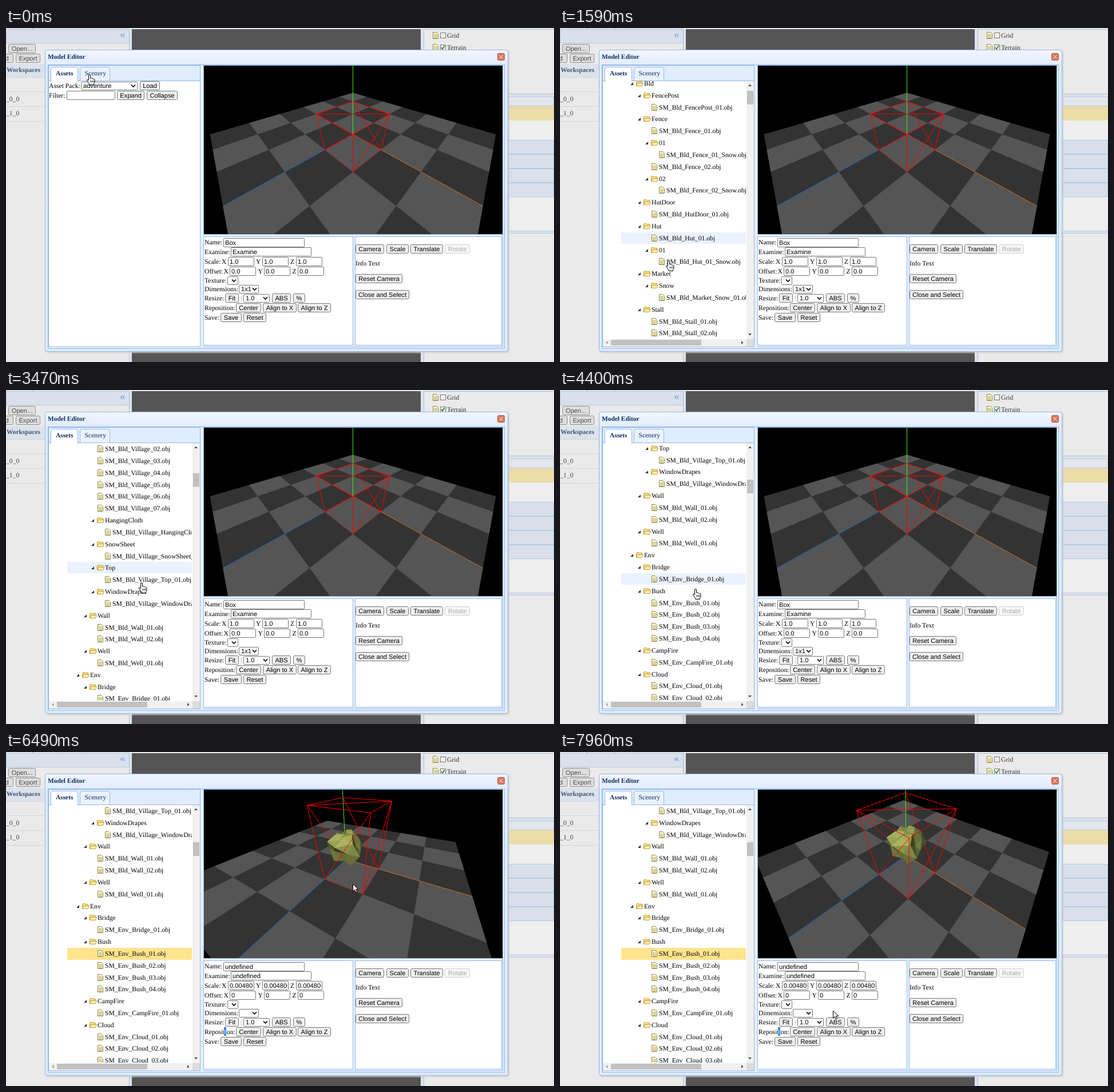
An HTML page with a canvas for the animation above (8000 ms loop, 958x585 px).

```html
<!DOCTYPE html>
<html lang="en">
<head>
<meta charset="utf-8">
<title>Model Editor</title>
<style>
html, body { margin: 0; width: 100%; height: 100%; overflow: hidden; background: #eaeaea; }
canvas { display: block; }
</style>
</head>
<body>
<canvas id="stage" width="958" height="585"></canvas>
<script>
const ctx = document.getElementById('stage').getContext('2d');
ctx.textRendering = 'geometricPrecision';
const LOOP = 8000;
const SERIF = '11.67px "Liberation Serif", serif';
const BOLD = 'bold 11.4px "Liberation Serif", serif';
const SANS = '11.11px "Liberation Sans", sans-serif';
const BLUE = '#95b8e7';

// ---------- helpers ----------
function rect(x, y, w, h, fill, stroke) {
  if (fill) { ctx.fillStyle = fill; ctx.fillRect(x, y, w, h); }
  if (stroke) { ctx.strokeStyle = stroke; ctx.lineWidth = 1; ctx.strokeRect(x + .5, y + .5, w - 1, h - 1); }
}
function rounded(x, y, w, h, r, fill, stroke) {
  ctx.beginPath();
  ctx.roundRect(x + .5, y + .5, w - 1, h - 1, r);
  ctx.fillStyle = fill; ctx.fill();
  ctx.strokeStyle = stroke; ctx.lineWidth = 1; ctx.stroke();
}
function text(s, x, y, font = SERIF, color = '#000', align = 'left') {
  ctx.font = font; ctx.fillStyle = color; ctx.textAlign = align;
  ctx.fillText(s, x, y + 4);
}
function poly(points, fill, stroke) {
  ctx.beginPath();
  points.forEach(p => ctx.lineTo(p[0], p[1]));
  ctx.closePath();
  if (fill) { ctx.fillStyle = fill; ctx.fill(); }
  if (stroke) { ctx.strokeStyle = stroke; ctx.lineWidth = 1; ctx.stroke(); }
}
function line(a, b, color, dash = []) {
  ctx.beginPath();
  ctx.moveTo(a[0], a[1]); ctx.lineTo(b[0], b[1]);
  ctx.strokeStyle = color; ctx.lineWidth = 1;
  ctx.setLineDash(dash); ctx.stroke(); ctx.setLineDash([]);
}
function clip(x, y, w, h, draw) {
  ctx.save();
  ctx.beginPath(); ctx.rect(x, y, w, h); ctx.clip();
  draw();
  ctx.restore();
}
// fill, border and text colour
const NORMAL = ['#efefef', '#767676', '#000'], DISABLED = ['#f7f7f7', '#cfcfcf', '#aaa'], DIMMED = ['#dedede', '#8f8f8f', '#4a4a4a'];
function button(s, x, cy, w, [fill, border, color] = NORMAL) {
  rounded(x, cy - 8, w, 16, 2, fill, border);
  text(s, x + w / 2, cy, SANS, color, 'center');
}
function input(s, x, cy, w) {
  rounded(x, cy - 8, w, 16, 1, '#fff', '#767676');
  clip(x + 2, cy - 8, w - 4, 16, () => text(s, x + 3, cy, SANS));
}
function select(s, x, cy, w) {
  rounded(x, cy - 7, w, 15, 1, '#fff', '#767676');
  text(s, x + 4, cy, SANS);
  ctx.beginPath();
  ctx.moveTo(x + w - 11, cy - 1.5); ctx.lineTo(x + w - 7.5, cy + 2); ctx.lineTo(x + w - 4, cy - 1.5);
  ctx.strokeStyle = '#000'; ctx.lineWidth = 1.7; ctx.stroke();
}
// keys: rows of [time, value...], linear in between
function track(keys, t) {
  const i = keys.findIndex(k => k[0] > t);
  if (i === 0) return keys[0].slice(1);
  if (i < 0) return keys[keys.length - 1].slice(1);
  const a = keys[i - 1], b = keys[i], f = (t - a[0]) / (b[0] - a[0]);
  return a.slice(1).map((v, n) => v + (b[n + 1] - v) * f);
}

// ---------- motion ----------
const SCROLL = [[1480, -83.3], [1590, 0], [1720, 0], [2210, 249.5], [2410, 249.5], [2840, 455],
  [3150, 455], [3470, 660.5], [3880, 660.5], [4450, 889.8]];
const POINTER = [[0, 146, 82], [110, 146, 82], [330, 249, 103], [420, 249, 103], [600, 219, 120], [700, 219, 120],
  [850, 200, 268], [960, 198, 290], [1260, 190, 408], [1700, 190, 408], [2210, 225, 358], [2410, 225, 358],
  [3150, 228, 350], [3470, 237, 338], [4610, 237, 351], [5400, 237, 351], [5650, 382, 478],
  [5880, 501, 433], [6180, 586, 236], [6290, 588, 235], [6910, 643, 223], [7020, 643, 224],
  [7320, 586, 233], [7480, 586, 233], [7700, 394, 400], [7960, 477, 453]];
const CAMERA = [[6240, 45, 43.3], [6910, 0, 38.3], [7020, 0, 38.3], [7320, 43, 53.1]];
const LOADED = 600, PICKED = 5030, MODEL = 5470, MARKED = 5650;

// ---------- page behind ----------
function fileIcon(x, cy) {
  poly([[x + .5, cy - 5.5], [x + 6.5, cy - 5.5], [x + 9.5, cy - 2.5], [x + 9.5, cy + 5.5], [x + .5, cy + 5.5]], '#fbf8d5', '#8d8950');
  for (let i = -2; i < 5; i += 2) rect(x + 2, cy + i, 6, 1, '#b5ad62');
}
function page() {
  rect(0, 0, 958, 585, '#eaeaea');
  rect(0, 0, 216, 1, '#d2d8e0');
  rect(47, 0, 1, 2, '#999'); rect(96, 0, 1, 2, '#bbb'); rect(134, 0, 1, 2, '#bbb');
  rect(0, 2, 216, 25, '#d9e0eb', '#b6c8e2');
  text('«', 199, 13, '19px "Liberation Serif", serif', '#6b9be0');
  button('Open...', 4, 36, 48, DIMMED);
  button('nd', -16, 53, 29, DIMMED);
  button('Export', 17, 53, 43, DIMMED);
  rect(0, 63, 216, 23, '#dce2ec');
  text('Workspaces', 1, 73, BOLD, '#3f5470');
  [86, 111, 137, 163].forEach(y => rect(0, y, 216, 1, '#d3d6da'));
  text('_0_0', 0, 124, SERIF, '#444');
  text('_1_0', 0, 149, SERIF, '#444');
  rect(215, 2, 1, 583, '#a9bfdd');
  rect(216, 2, 4, 583, '#dde3eb');
  rect(220, 2, 505, 583, '#555');
  rect(725, 2, 5, 583, '#dde3eb');
  rect(730, 2, 1, 583, '#a9bfdd');
  rect(730, 2, 228, 1, '#a9bfdd');
  [['Grid', 13], ['Terrain', 34]].forEach(([s, y]) => {
    fileIcon(746, y);
    rect(759, y - 5, 10, 10, '#f3f3f3', '#777');
    text(s, 771, y, SERIF, '#333');
  });
  ctx.beginPath(); ctx.moveTo(761, 34); ctx.lineTo(763, 37); ctx.lineTo(767, 31);
  ctx.strokeStyle = '#39902d'; ctx.lineWidth = 1.8; ctx.stroke();
  rect(730, 115, 228, 1, '#a9bfdd'); rect(730, 116, 228, 4, '#dde3eb');
  rect(730, 120, 228, 17, '#e2e6ed', '#b8c9e0');
  rect(730, 137, 228, 25, '#ebdca8');
  rect(730, 162, 228, 34, '#eee');
  for (let i = 0; i < 4; i++) rect(730, 196 + i * 25.2 | 0, 228, 25, '#d9e0ec', '#b5c8e4');
  rect(730, 297, 228, 58, '#eee');
  rect(730, 355, 228, 5, '#dde3eb', '#b5c8e4');
}

// ---------- dialog frame ----------
function dialog() {
  const g = ctx.createLinearGradient(0, 38, 0, 65);
  g.addColorStop(0, '#f1f6ff'); g.addColorStop(1, '#e0ecff');
  ctx.save();
  ctx.shadowColor = '#ccc'; ctx.shadowBlur = 2.5; ctx.shadowOffsetX = ctx.shadowOffsetY = 1.7;
  rounded(68, 38, 810, 529, 4, g, BLUE);
  ctx.restore();
  rounded(68, 38, 810, 529, 4, g, BLUE);
  text('Model Editor', 73, 50, BOLD, '#0e2d5f');
  rounded(859, 44, 13, 13, 2, '#d9775f', '#b95745');
  line([862.5, 47.5], [868.5, 53.5], '#fff'); line([868.5, 47.5], [862.5, 53.5], '#fff');
  rect(73, 64, 799, 498, '#e6f0ff', BLUE);
  rect(74, 65, 266, 494, '#fff', BLUE);
  rect(345, 65, 524, 297, '#000', BLUE);
  rect(345, 365, 262, 191, '#fff', BLUE);
  rect(610, 365, 257, 191, '#fff', BLUE);
  rect(868, 65, 1, 494, BLUE);
  rect(345, 558, 524, 1, BLUE);
}
function tabs() {
  rect(75, 66, 264, 27, '#e0ecff');
  rect(75, 92, 264, 1, BLUE);
  rounded(129, 68, 53, 25, [4, 4, 0, 0], '#eaf2ff', BLUE);
  rounded(78, 68, 48, 26, [4, 4, 0, 0], '#fff', BLUE);
  rect(79, 92, 46, 2, '#fff');
  text('Assets', 87, 79, BOLD, '#0e2d5f');
  text('Scenery', 137.5, 79, SERIF, '#0e2d5f');
}

// ---------- asset tree: depth digit, name; * marks a file ----------
const TREE = `0SM 1Bld 2FencePost 3*FencePost_01 2Fence 3*Fence_01 301 4*Fence_01_Snow 3*Fence_02 302 4*Fence_02_Snow
2HutDoor 3*HutDoor_01 2Hut 3*Hut_01 301 4*Hut_01_Snow 2Market 3Snow 4*Market_Snow_01
2Stall 3*Stall_#4 3Cover 4*Stall_Cover_#5 2Village 3*Village_#7 3HangingCloth 4*Village_HangingCloth_01
3SnowSheet 4*Village_SnowSheet_01 3Top 4*Village_Top_01 3WindowDrapes 4*Village_WindowDrapes_01
2Wall 3*Wall_#2 2Well 3*Well_01 1Env 2Bridge 3*Bridge_01 2Bush 3*Bush_#4 2CampFire 3*CampFire_01 2Cloud 3*Cloud_#4`
  .split(/\s+/).flatMap(s => {
    const m = s.match(/(.*)#(\d)/);
    return m ? Array.from({ length: +m[2] }, (_, i) => m[1] + '0' + (i + 1)) : [s];
  });
let group = '';
const ROWS = TREE.map(s => {
  const depth = +s[0], file = s[1] === '*';
  if (depth === 1) group = s.slice(1);
  return { depth, file, name: file ? `SM_${group}_${s.slice(2)}.obj` : s.slice(1) };
});
const PITCH = 20.83;

function folderIcon(x, cy) {
  poly([[x + .5, cy + 4.5], [x + .5, cy - 3.5], [x + 1.5, cy - 4.5], [x + 4.5, cy - 4.5], [x + 5.5, cy - 3.5], [x + 10.5, cy - 3.5], [x + 10.5, cy + 4.5]], '#f8dc82', '#c09c3c');
  poly([[x + 1, cy + 4.5], [x + 2.5, cy - .5], [x + 12.5, cy - .5], [x + 10.5, cy + 4.5]], '#ffefb0', '#c6a040');
}
function tree(t, pointer) {
  const off = track(SCROLL, t)[0];
  clip(75, 93, t < LOADED ? 264 : 250, t < LOADED ? 465 : 451, () => {
    const top = -83.3 - off;
    text('Asset Pack:', 75, 101 + top);
    select('adventure', 131, 101 + top, 99);
    button('Load', 234, 101 + top, 35);
    text('Filter:', 75, 118 + top);
    input('', 106, 118 + top, 85);
    button('Expand', 194, 118 + top, 48);
    button('Collapse', 246, 118 + top, 54);
    if (t < LOADED) return;
    const lag = track(SCROLL, t - 45)[0];
    const hover = Math.round((pointer[1] + lag - 97) / PITCH) + 1;
    const picked = ROWS.findIndex(r => r.name === 'SM_Env_Bush_01.obj');
    ROWS.forEach((r, i) => {
      const y = 97 + (i - 1) * PITCH - off, cy = Math.round(y), x = 107 + r.depth * 13;
      if (y < 75 || y > 565) return;
      if (t >= PICKED && i === picked) rect(107, cy - 10, 218, 21, '#ffe48d');
      else if (i === hover && t < PICKED && pointer[1] > 135) rect(107, cy - 10, 218, 20, '#eaf2ff');
      if (r.file) fileIcon(x + 14, cy);
      else {
        poly([[x + 8, cy - 2], [x + 8, cy + 3], [x + 3, cy + 3]], '#333');
        folderIcon(x + 13, cy);
      }
      text(r.name, x + 27, cy);
    });
  });
  if (t < LOADED) return;
  rect(326, 93, 13, 452, '#f1f1f1');
  rect(327, 110 + off * .054, 11, 24, '#c1c1c1');
  rect(75, 545, 264, 13, '#f1f1f1');
  rect(89, 546, 158, 10, '#c1c1c1');
  rect(326, 545, 13, 13, '#dcdcdc');
  poly([[329, 102], [335, 102], [332, 98.5]], '#505050');
  poly([[329, 535], [335, 535], [332, 538.5]], '#505050');
  poly([[83.5, 548], [83.5, 554], [80, 551]], '#a3a3a3');
  poly([[317, 548], [317, 554], [320.5, 551]], '#505050');
}

// ---------- form ----------
function form(t) {
  const set = t >= PICKED, label = (s, y) => text(s, 347, y);
  label('Name:', 375); input(set ? 'undefined' : 'Box', 380, 376, 142);
  label('Examine:', 392); input(set ? 'undefined' : 'Examine', 393, 392, 141);
  [['Scale:', 409, set ? '0.00480076' : '1.0', 388, 377], ['Offset:', 426, set ? '0' : '0.0', 391, 380.5]].forEach(([s, y, v, x, lx]) => {
    label(s, y);
    ['X', 'Y', 'Z'].forEach((axis, i) => {
      text(axis, lx + i * 60, y);
      input(v, x + Math.round(i * 59.5), y, 46);
    });
  });
  label('Texture:', 442); select('', 387, 442, 19);
  label('Dimensions:', 457); select(set ? '' : '1x1', 407, 457, 35);
  label('Resize:', 473); button('Fit', 383, 473, 24);
  text('|', 410, 473, SERIF, '#999');
  select('1.0', 415, 473, 46); button('ABS', 465, 473, 33); button('%', 502, 473, 21);
  label('Reposition:', 490);
  if (t >= MARKED) {
    rect(381, 482, 4, 15, '#2f86f0');
    rect(382, 487, 1, 7, '#fff');
  }
  button('Center', 402, 490, 44); button('Align to X', 449, 490, 59); button('Align to Z', 510, 490, 58);
  label('Save:', 507); button('Save', 375, 507, 37); button('Reset', 415, 507, 40);
  button('Camera', 611, 387, 50); button('Scale', 665, 387, 39);
  button('Translate', 707, 387, 57); button('Rotate', 767, 387, 44, DISABLED);
  text('Info Text', 611, 412);
  button('Reset Camera', 611, 439, 82);
  button('Close and Select', 611, 467, 94);
}

// ---------- 3D view ----------
const FX = 202, FY = 191.57, DIST = 2.915;
let seed = 11;
const rnd = () => (seed = (seed * 16807) % 2147483647) / 2147483647;

// spiky low-poly ball standing on the origin
const BUSH = (() => {
  const R = 6, S = 9, v = [];
  for (let i = 0; i <= R; i++) {
    const row = [], pole = i === 0 || i === R, tip = .4 + rnd() * .06;
    for (let j = 0; j < S; j++) {
      const r = pole ? tip : .35 + rnd() * .19;
      const a = (j + (i % 2) / 2 + (rnd() - .5) * .6) / S * Math.PI * 2;
      const b = (i + (pole ? 0 : (rnd() - .5) * .6)) / R * Math.PI;
      row.push([r * Math.sin(b) * Math.cos(a), .4 + r * Math.cos(b), r * Math.sin(b) * Math.sin(a)]);
    }
    v.push(row);
  }
  const faces = [];
  for (let i = 0; i < R; i++) for (let j = 0; j < S; j++) {
    const k = (j + 1) % S, [a, b, c, d] = [v[i][j], v[i][k], v[i + 1][j], v[i + 1][k]];
    if (i % 2) faces.push([a, b, d], [a, d, c]); else faces.push([a, b, c], [b, d, c]);
  }
  return faces.map(p => {
    const [a, b, c] = p, u = b.map((q, n) => q - a[n]), w = c.map((q, n) => q - a[n]);
    const n = [u[1] * w[2] - u[2] * w[1], u[2] * w[0] - u[0] * w[2], u[0] * w[1] - u[1] * w[0]];
    const lit = Math.max(0, (n[0] * .1 + n[1] * .8 + n[2] * .55) / (Math.hypot(...n) || 1));
    const k = .36 + .68 * lit + (rnd() - .5) * .12;
    return { p, color: `rgb(${158 * k | 0},${168 * k | 0},${88 * k | 0})` };
  });
})();

function view(t) {
  const [azDeg, elDeg] = track(CAMERA, t), rad = Math.PI / 180;
  const sa = Math.sin(azDeg * rad), ca = Math.cos(azDeg * rad), s = Math.sin(elDeg * rad), c = Math.cos(elDeg * rad);
  const project = ([x, y, z]) => {
    const u = (x - .5) * sa + (z - .5) * ca, r = (x - .5) * ca - (z - .5) * sa, d = DIST - u * c - y * s;
    return [606.5 + FX * r / d, 213.3 + FY * (u * s - y * c) / d, d];
  };
  const seg = (a, b, color, dash) => line(project(a), project(b), color, dash);
  const h = t >= PICKED ? 1.6 : 1, red = '#f00';
  clip(346, 66, 522, 295, () => {
    rect(346, 66, 522, 295, '#000');
    poly([[-3, 0, -3], [3, 0, -3], [3, 0, 3], [-3, 0, 3]].map(project), '#333');
    for (let x = -3; x < 3; x++) for (let z = -3; z < 3; z++)
      if (!((x + z) & 1)) poly([[x, 0, z], [x + 1, 0, z], [x + 1, 0, z + 1], [x, 0, z + 1]].map(project), '#555');
    seg([0, 0, 0], [0, 0, 3], '#1c63bd');
    seg([0, 0, 0], [3, 0, 0], '#c8701f');
    // edges on the ground and behind the model
    seg([0, 0, 1], [1, 0, 1], '#d01c1c', [4, 1]);
    seg([1, 0, 0], [1, 0, 1], '#d01c1c', [4, 1]);
    if (h === 1) {
      seg([0, 0, 0], [1, 0, 0], '#e01010', [4, 1]);
      seg([0, 0, 0], [0, 0, 1], red);
    }
    seg([0, 0, 0], [0, h, 1], red);
    seg([1, 0, 0], [0, h, 0], red);
    seg([0, 0, 0], [0, 1.9, 0], '#3cf01e');
    if (t >= MODEL) {
      BUSH.map(f => ({ q: f.p.map(project), color: f.color }))
        .sort((a, b) => b.q[0][2] + b.q[1][2] + b.q[2][2] - a.q[0][2] - a.q[1][2] - a.q[2][2])
        .forEach(f => poly(f.q, f.color, f.color));
    }
    const top = [[0, h, 0], [1, h, 0], [1, h, 1], [0, h, 1]];
    top.forEach((p, i) => seg(p, top[(i + 1) % 4], red));
    seg(top[3], top[1], red);
    top.slice(1).forEach(p => seg([p[0], 0, p[2]], p, red));
    seg([1, 0, 1], [1, h, 0], red);
    seg([0, 0, 1], [1, h, 1], red);
  });
}

// ---------- pointer ----------
const ARROW = new Path2D('M.5 .5V13L3.5 10.3 5.6 15 7.7 14 5.7 9.5H9.8Z');
const HAND = new Path2D('M-1.5 9V1Q-1.5-.5 0-.5T1.5 1V6Q3.5 5 4.3 6.8 6.2 6 6.8 7.6 9 7 9 9V12Q9 14 7.5 15.5V17.5H0V16Q-2 14-3 12T-4.8 9.2Q-4.5 7.5-1.5 9.5Z');
function cursor(t, [x, y]) {
  const hand = t < 180 || (t > 800 && t < 5450);
  ctx.save();
  ctx.translate(Math.round(x), Math.round(y));
  ctx.fillStyle = '#fff'; ctx.strokeStyle = '#000'; ctx.lineWidth = 1;
  const shape = hand ? HAND : ARROW;
  ctx.fill(shape); ctx.stroke(shape);
  if (hand) [2, 4.5, 7].forEach(v => line([v, 10], [v, 13], '#000'));
  ctx.restore();
}

function frame(now) {
  const t = now % LOOP, pointer = track(POINTER, t);
  page();
  dialog();
  tree(t, pointer);
  tabs();
  form(t);
  view(t);
  cursor(t, pointer);
  requestAnimationFrame(frame);
}
requestAnimationFrame(frame);
</script>
</body>
</html>
```
